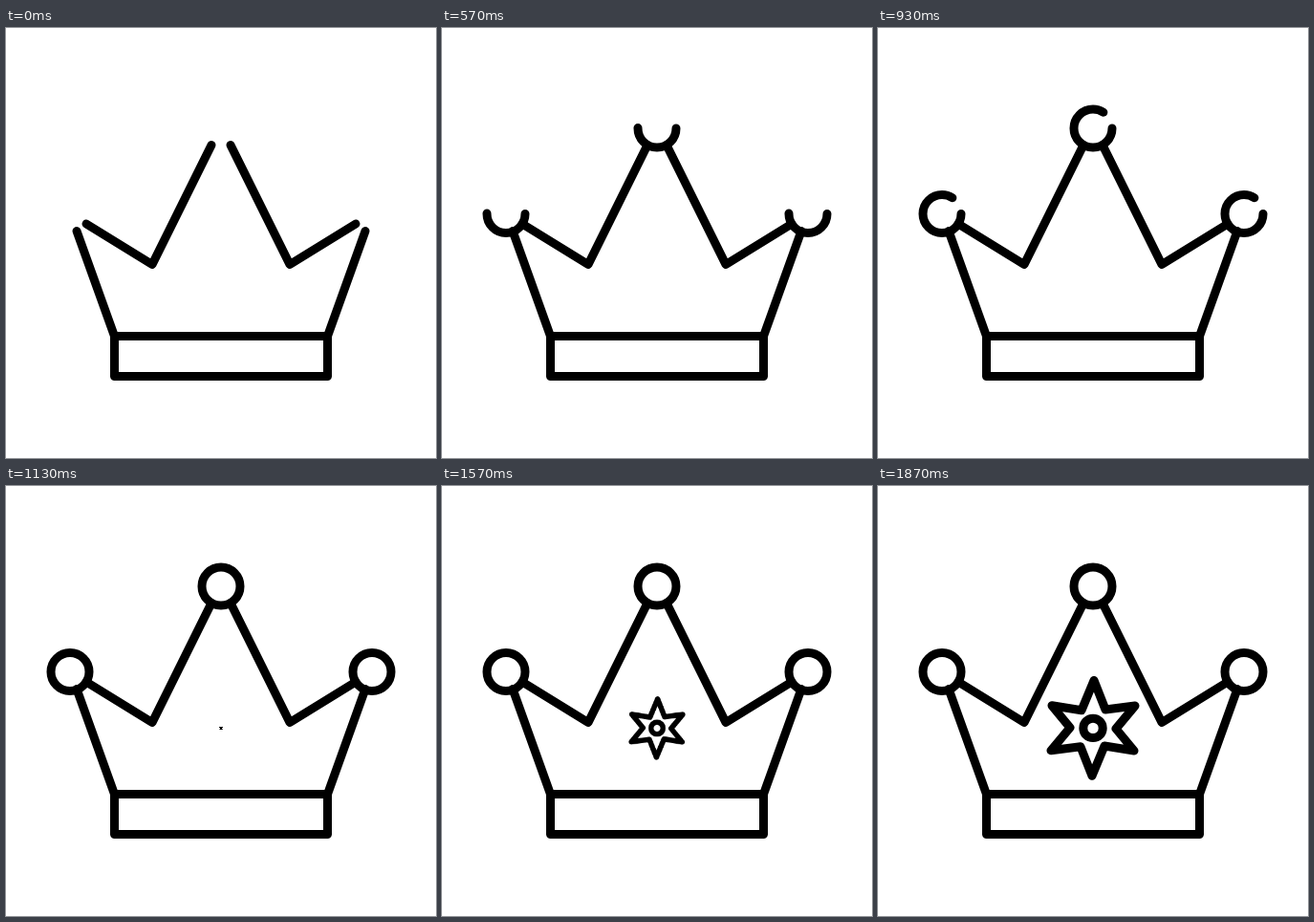
An HTML page without scripts that plays this animation: 450x450 px, repeating every 2.93 s.

```html
<!DOCTYPE html>
<html lang="en">
<head>
<meta charset="utf-8">
<title>Crown</title>
<style>
  html, body { margin: 0; width: 100%; height: 100%; overflow: hidden; background: #fff; }
  svg { display: block; width: 100%; height: 100%; }
  .ink { fill: none; stroke: #000; stroke-width: 9; stroke-linecap: round; stroke-linejoin: round; }
  .ball { stroke-dasharray: 1 2; animation: draw 2930ms linear infinite; }
  .star { transform-origin: 225px 253.4px; animation: grow 2930ms linear infinite; }

  /* balls appear at 70 ms and close at 1100 ms */
  @keyframes draw {
    0%, 2.34% { stroke-dashoffset: 1; opacity: 0; }
    2.35% { stroke-dashoffset: .966; opacity: 1; }
    37.54%, 100% { stroke-dashoffset: 0; opacity: 1; }
  }
  /* star appears at 1130 ms and is full size at 1870 ms */
  @keyframes grow {
    0%, 38.5% { transform: scale(0); }
    38.53% { transform: scale(.038); }
    63.82%, 100% { transform: scale(1); }
  }
</style>
</head>
<body>
<svg viewBox="0 0 450 450">
  <g class="ink">
    <rect x="113.5" y="322.5" width="223" height="42"/>
    <path id="side" d="M74 212.500 L113.500 322.500 M84 205 L153 247.500 L215 122.500"/>
    <use href="#side" transform="matrix(-1 0 0 1 450 0)"/>

    <circle class="ball" cx="67" cy="194.500" r="20" pathLength="1"/>
    <circle class="ball" cx="225" cy="105" r="20" pathLength="1"/>
    <circle class="ball" cx="383" cy="194.500" r="20" pathLength="1"/>

    <g class="star">
      <path d="M226 203.500 L238 234 L269 230 L249 254 L268 277 L237 272 L224 303.300 L212 272.800 L181 276.800 L201 252.800 L182 229.800 L213 234.800 Z"/>
      <circle cx="225" cy="253.400" r="10.200"/>
    </g>
  </g>
</svg>
</body>
</html>
```
